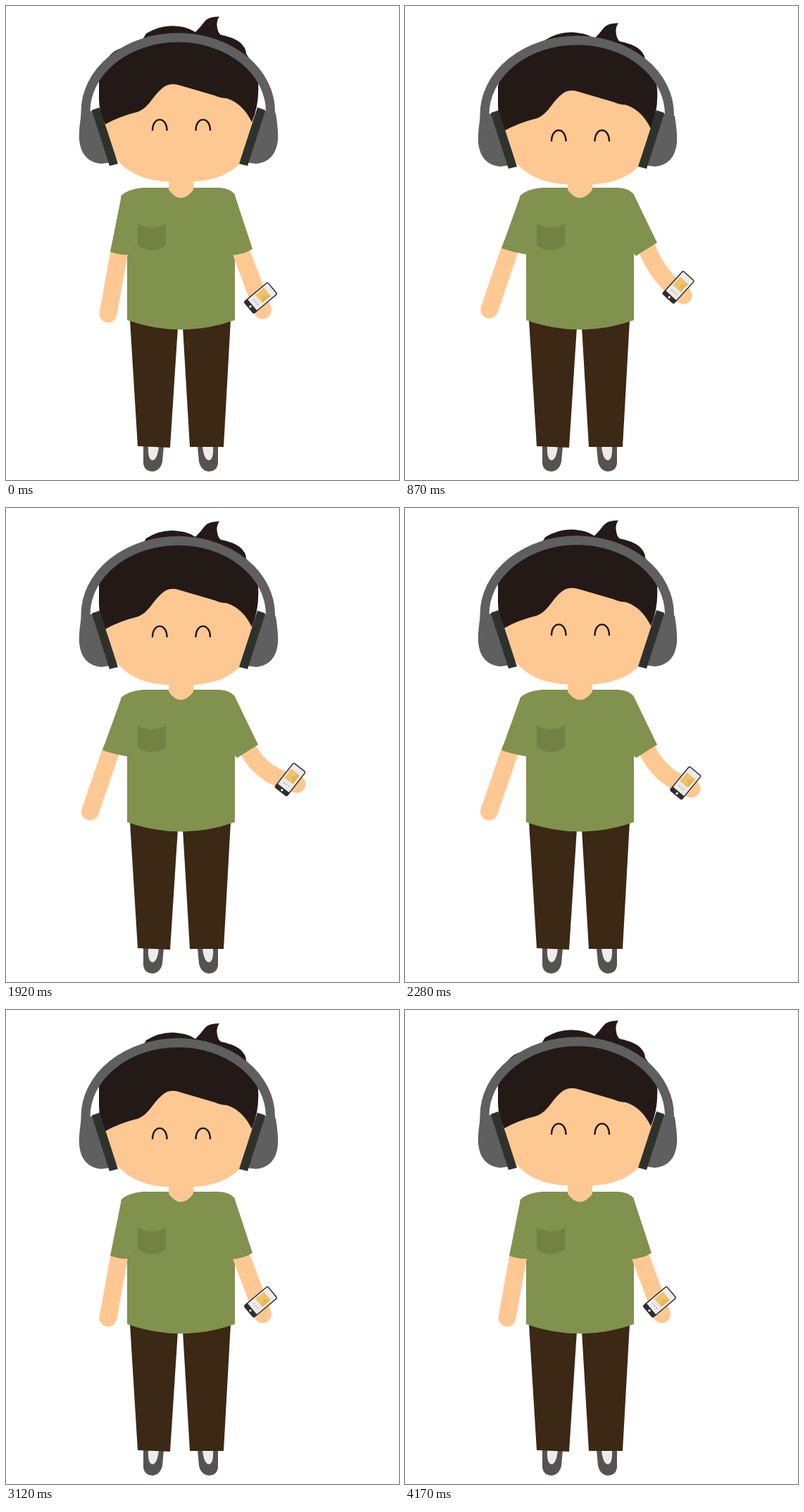
Animation, 558 px wide and 673 px high, one loop 4200 ms. Source, as an HTML page:

```html
<!DOCTYPE html>
<html>
<head>
<meta charset="utf-8">
<style>
html, body { margin: 0; height: 100%; overflow: hidden; background: #fff; }
svg { display: block; }
.skin { fill: #fec893; }
.shirt { fill: #81914e; }
.pants { fill: #3b2815; }
.hair { fill: #231916; }
.arm { fill: none; stroke: #fec893; stroke-width: 25; stroke-linecap: round; }
.eyes { fill: none; stroke: #1d1411; stroke-width: 2.4; }
</style>
</head>
<body>
<svg width="558" height="673" viewBox="0 0 558 673">
  <defs>
    <g id="shoe">
      <path fill="#575252" d="M195 625V650Q197 661 208 661Q219 660 222 647L224 625Z"/>
      <path fill="#ececec" d="M202 625Q201 644 208 645Q215 644 217 625Z"/>
    </g>
    <g id="cup">
      <path fill="#5f5f5f" d="M107 152Q103 178 104 190Q107 221 135 224L150 222L126 148Z"/>
      <path fill="#2e322d" d="M122 149Q122 147 124 147L133 144L159 224L147 227Z"/>
    </g>
    <path id="eye" d="M208 177C208 156 228.500 156 228.500 177"/>
  </defs>

  <use href="#shoe"/>
  <use href="#shoe" transform="translate(496) scale(-1 1)"/>
  <path class="pants" d="M176 446L244 456L233 627L187 625ZM251 456L319 446L309 626L261 626Z"/>
  <path class="shirt" d="M194 258H303Q319 259 325 268V446Q248 473 172 446V300L163 270Q172 260 194 258Z"/>
  <path class="skin" d="M231 240V261Q248 284 266 261V240Z"/>
  <path fill="#738243" d="M187 309Q207 320 227 309V340Q207 353 187 340Z"/>

  <path id="armL" class="arm"/>
  <path id="sleeveL" class="shirt"/>
  <path id="armR" class="arm"/>
  <path id="sleeveR" class="shirt"/>
  <g id="phone">
    <rect x="-22.5" y="-11.5" width="45" height="23" rx="3" fill="#322e2d"/>
    <rect x="-15.5" y="-10" width="36.5" height="20" rx="1" fill="#ebebeb"/>
    <rect x="-3" y="-8" width="16" height="15" fill="#f0c269"/>
    <path d="M-3 7L5 -1L13 7Z" fill="#e6b455"/>
    <circle cx="-19" r="1.6" fill="#fff"/>
    <path d="M-9 -5v2m0 2v2m0 2v2" stroke="#b9a9a5" stroke-width="1.6"/>
  </g>

  <path id="face" class="skin" d="M138 142Q142 190 158 219Q184 249 235 249.500H262Q312 248 335 220Q350 190 354 142L300 100H190Z"/>
  <path id="hair" class="hair" d="M141 168Q132 150 132 132V105Q134 88 146 72Q154 62 164 60L190 54L199 39
    Q222 25 246 29Q258 30 269 37Q276 30 282 22Q287 15 303 15Q298 22 300 31Q301 38 305 41
    Q330 46 337 57Q341 62 341 68Q356 86 358 108Q360 140 349 165Q336 138 313 131
    Q305 131 296 127L248 113Q234 108 224 115Q216 121 208 132Q198 146 188 150Q160 157 141 168Z"/>
  <g id="eyes" class="eyes"><use href="#eye"/><use href="#eye" x="61.5"/></g>
  <g id="phones">
    <path fill="none" stroke="#5f5f5f" stroke-width="13" d="M113 165V150A131 105 0 0 1 375.500 150V165"/>
    <use href="#cup"/>
    <use href="#cup" transform="translate(490) scale(-1 1)"/>
  </g>
</svg>
<script>
const $ = id => document.getElementById(id);
const clamp = x => Math.max(0, Math.min(1, x));
const mix = (a, b, k) => a.map((v, i) => v + (b[i] - v) * k);
const LOOP = 4200, BEAT = 600, SWING = 570, RAISE = 510, LOWER = 2210;
const NOD = { face: 4, phones: 4, hair: 9.2, eyes: 15.4 };

function draw(t) {
  const nod = (1 - Math.cos(2 * Math.PI * (t + 15) / BEAT)) / 2;
  for (const id in NOD) $(id).setAttribute("transform", `translate(0 ${NOD[id] * nod})`);

  // The shoulders settle before the right forearm, whose hand swings along a bow
  const raise = clamp((t - RAISE) / SWING) - clamp((t - LOWER) / SWING);
  const lift = clamp(raise / .64);
  const bow = 4.5 * Math.sin(Math.PI * raise);
  const path = (id, d) => $(id).setAttribute("d", d);

  const tipL = mix([148, 349], [137, 344], lift);
  const elbowL = mix([162, 343], [150, 342], lift);
  const handL = mix([145, 437], [119.5, 431], lift);
  path("sleeveL", `M200 275L164 269L${tipL}Q${tipL[0] + 14} ${tipL[1] + 5} 174 353L176 320Z`);
  path("armL", `M${elbowL}L${handL}`);

  const tipR = mix([350, 345], [358, 336], lift);
  const cuffR = mix([320, 354], [328, 355], lift);
  const elbowR = mix([333, 347], [343, 342], lift);
  const bendR = mix([349, 389], [363, 381], raise);
  const handR = mix([364.5, 432], [413, 392], raise);
  path("sleeveR", `M290 275L324 266L${tipR}Q${tipR[0] - 13} ${tipR[1] + 8} ${cuffR}L300 320Z`);
  path("armR", `M${elbowR}Q${bendR} ${handR[0]} ${handR[1] + bow}`);

  const [x, y, angle] = mix([361.5, 414.5, -40], [403.5, 385.5, -52], raise);
  $("phone").setAttribute("transform", `translate(${x} ${y + bow * .8}) rotate(${angle})`);
}

const start = performance.now();
function tick() {
  draw((performance.now() - start) % LOOP);
  requestAnimationFrame(tick);
}
tick();
</script>
</body>
</html>
```
